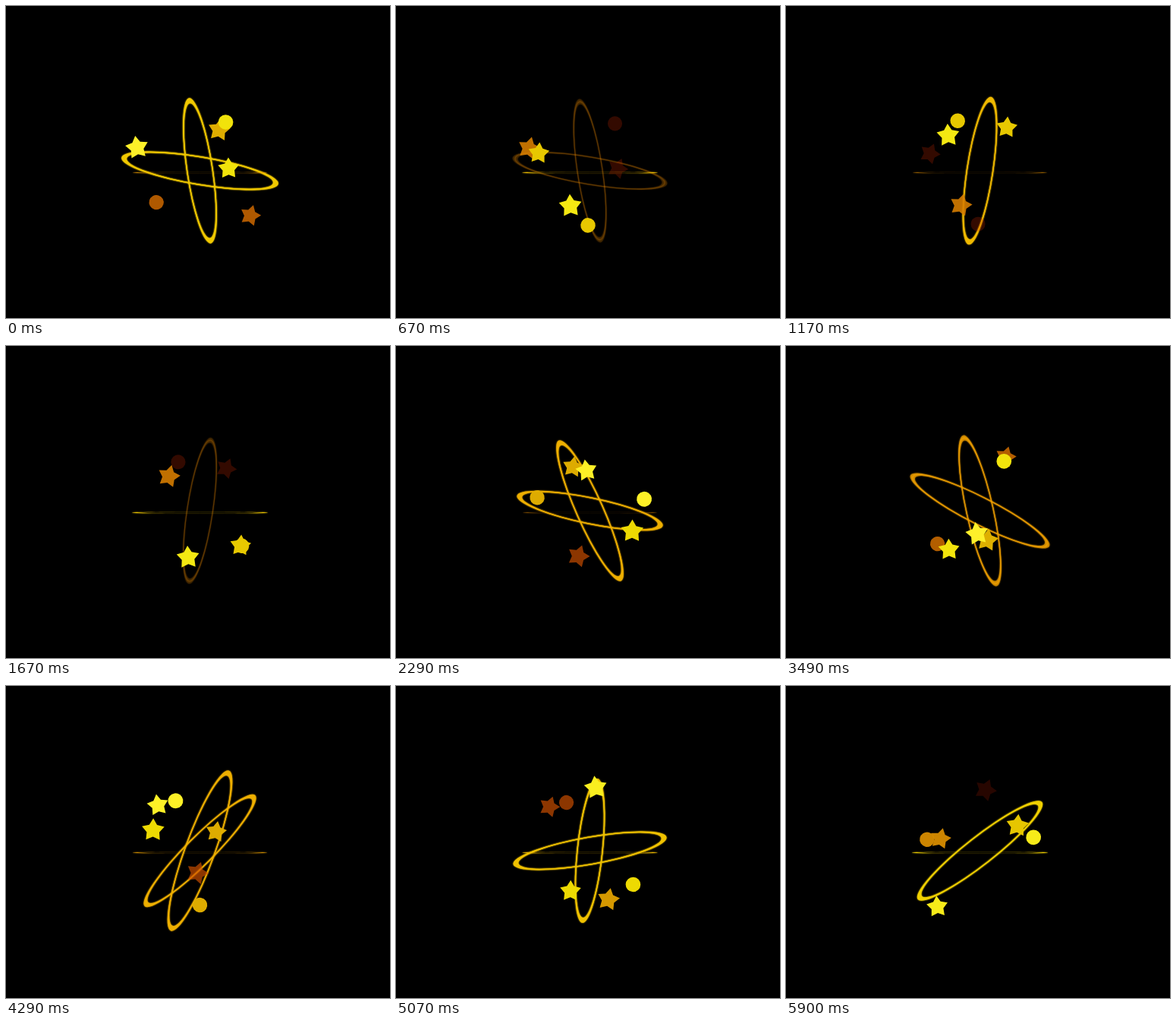
These frames come from a looping animation (506x411 px, 5930 ms). An HTML page with a canvas:

```html
<!DOCTYPE html>
<html>
<head>
<meta charset="utf-8">
<style>
  html, body { margin: 0; width: 100%; height: 100%; overflow: hidden; background: #000; }
  canvas { display: block; }
</style>
</head>
<body>
<canvas id="stage" width="506" height="411"></canvas>
<script>
const ctx = document.getElementById('stage').getContext('2d');
const LOOP = 5930, BEAT = 500, CX = 255.5, CY = 217, RAD = Math.PI / 180;
const SPARK_LIFE = .96, RING_LIFE = .84;

// Where each beat's star appears
const onBeat = [[323, 277], [293, 214], [188, 194], [291, 160], [309, 263], [233, 159], [251, 165],
  [290, 145], [215, 268], [277, 192], [201, 158], [230, 270], [203, 201], [200, 290]];
const offBeat = [[281, 163], [174, 187], [230, 263], [214, 171], [240, 278], [311, 244], [204, 226],
  [265, 256], [252, 247], [194, 190], [280, 282], [263, 135], [305, 184]];

// Rings born together each second: [tilt, half length]
const ringSets = [[[81.5, 95], [9.5, 103]], [[98.6, 97]], [[11.6, 97], [66, 100]], [[27, 102], [77.5, 101]],
  [[-70, 111], [-45, 102]], [[96, 94], [-10, 101]], [[-38, 102]]];

// Dots step around the centre, one with each star on the beat
function dotPlace(k) {
  const a = (144 + 154 * k) * RAD;
  return [CX + 72 * Math.cos(a), CY + 72 * Math.sin(a)];
}

const sparks = [
  ...onBeat.map((p, k) => ({ birth: -750 + BEAT * k, place: p, r: 14.5, star: true })),
  ...onBeat.map((_, k) => ({ birth: -750 + BEAT * k, place: dotPlace(k), r: 9.8 })),
  ...offBeat.map((p, k) => ({ birth: -530 + BEAT * k, place: p, r: 15.5, star: true }))
].sort((a, b) => a.birth - b.birth);

const rings = ringSets.flatMap((set, k) =>
  set.map(([tilt, half]) => ({ birth: -130 + 1000 * k, tilt, half, flat: .18 })));
for (let birth = -625; birth < LOOP; birth += 1085) {
  rings.push({ birth, tilt: 0, half: 88, flat: .012 });
}

function drawRing(t, { birth, tilt, half, flat }) {
  const age = (t - birth) / 1000;
  if (age < 0 || age >= RING_LIFE) return;
  const size = half * (1.01 - .02 * age) - 2.5;
  ctx.save();
  ctx.translate(CX, CY + (flat < .1 ? 2.5 : 0));
  ctx.rotate(tilt * RAD);
  ctx.strokeStyle = `rgb(240,${210 - 80 * age},0)`;
  ctx.globalAlpha = 1 - (age / RING_LIFE) ** 3.5;
  ctx.shadowColor = ctx.strokeStyle;
  ctx.shadowBlur = 2;
  // an even line, then a flattened band that swells at both tips
  ctx.beginPath();
  ctx.ellipse(0, 0, size, size * flat, 0, 0, 7);
  ctx.lineWidth = Math.min(1.4, size * flat * .1);
  ctx.stroke();
  ctx.scale(1, flat);
  ctx.lineWidth = 7;
  ctx.stroke();
  ctx.restore();
}

function starPath(r) {
  for (let i = 0; i < 10; i++) {
    const d = i % 2 ? r * .56 : r, a = i * 36 * RAD;
    ctx.lineTo(d * Math.sin(a), -d * Math.cos(a));
  }
}

function drawSpark(t, { birth, place, r, star }) {
  const age = (t - birth) / 1000;
  if (age < 0 || age >= SPARK_LIFE) return;
  const pull = 1 - .045 * (age - .4);
  ctx.save();
  ctx.translate(CX + (place[0] - CX) * pull, CY + (place[1] - CY) * pull);
  ctx.rotate((35 * age - 10) * RAD);
  // yellow cools to orange, then fades out
  ctx.fillStyle = `rgb(${255 - 55 * age},${240 * (1 - age ** 2.1)},${Math.max(0, 45 - 135 * age)})`;
  ctx.globalAlpha = 1 - (age / SPARK_LIFE) ** 7;
  ctx.beginPath();
  if (star) starPath(r * pull);
  else ctx.arc(0, 0, r * pull, 0, 7);
  ctx.fill();
  ctx.restore();
}

function frame() {
  const t = performance.now() % LOOP;
  ctx.fillStyle = '#000';
  ctx.fillRect(0, 0, 506, 411);
  rings.forEach(ring => drawRing(t, ring));
  sparks.forEach(spark => drawSpark(t, spark));
  requestAnimationFrame(frame);
}
frame();
</script>
</body>
</html>
```
